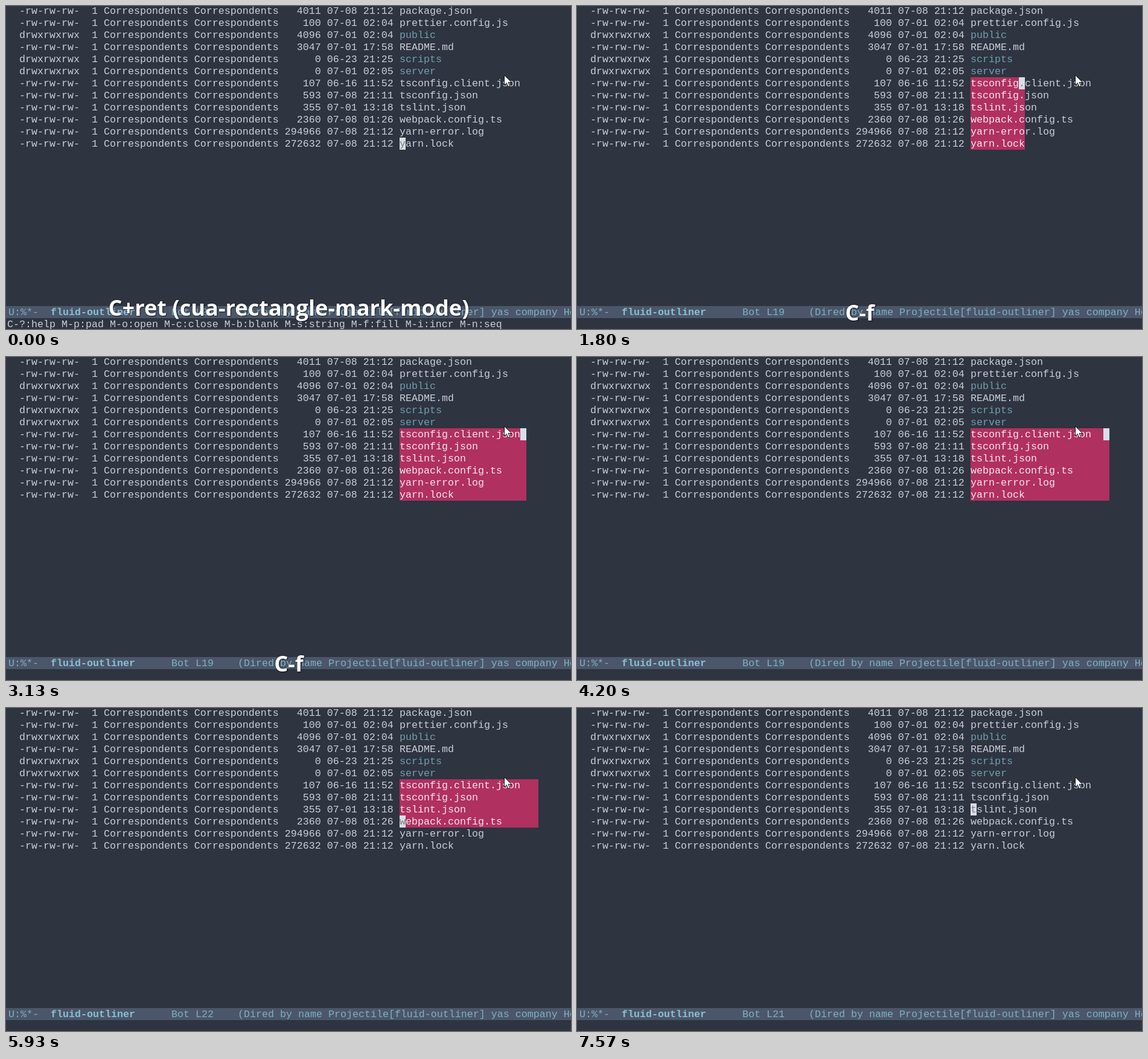
These frames come from a looping animation (936x535 px, 8000 ms). An HTML page:

```html
<!DOCTYPE html>
<html lang="en">
<head>
<meta charset="utf-8">
<title>Rectangle marking</title>
<style>
html, body { margin: 0; width: 100%; height: 100%; overflow: hidden; background: #2e3440; }
svg { display: block; }
text { white-space: pre; }
.mono { font: 16.664px "Liberation Mono", "Courier New", monospace; fill: #c9cfda; }
.mono .dir { fill: #709fad; }
.mono .bar { fill: #7db1c1; }
.mono .bold { fill: #88c0d0; font-weight: bold; }
.mono .hot { fill: #f4e6ec; }
.mono .under { fill: #857c74; }
#caption {
  font: bold 36.2px "Open Sans", "Noto Sans", sans-serif;
  fill: #fff; text-anchor: middle;
  text-shadow: 0 0 2px rgba(0,0,0,.55), 1px 1px 2px rgba(0,0,0,.55);
}
</style>
</head>
<body>
<svg width="936" height="535" viewBox="0 0 936 535">
  <defs><clipPath id="clip"><rect id="clipBox"/></clipPath></defs>
  <rect width="936" height="535" fill="#2e3440"/>
  <rect y="497" width="936" height="20" fill="#4c566a"/>
  <g class="mono">
    <g id="listing"></g>
    <rect id="region" fill="#b03060"/>
    <g id="hotNames" clip-path="url(#clip)"></g>
    <g id="cursor">
      <rect width="10" height="20" fill="#d8dee9"/>
      <text id="cursorChar" class="under" y="15"></text>
    </g>
    <text class="bar" x="4" y="512">U:%*-</text>
    <text class="bar bold" x="74" y="512">fluid-outliner</text>
    <text class="bar" x="274" y="512" id="position"></text>
    <text class="bar" x="384" y="512">(Dired by name Projectile[fluid-outliner] yas company Helm</text>
    <text id="hint" x="2" y="532">C-?:help M-p:pad M-o:open M-c:close M-b:blank M-s:string M-f:fill M-i:incr M-n:seq</text>
  </g>
  <text id="caption" x="468.5"></text>
  <path transform="translate(825.5 114.5)" d="M0 0V16.5L3.8 12.9L6.6 19.2L9.3 18L6.5 11.9H11.8Z"
        fill="#fff" stroke="#111" stroke-width="1"/>
</svg>
<script>
const LOOP = 8000, CELL = 10, LINE = 20, NAME_COL = 65;
const $ = id => document.getElementById(id);
const colX = col => 2 + col * CELL;
const rowY = row => -2 + row * LINE;

const files = [
  ['4011', '07-08 21:12', 'package.json'],
  ['100', '07-01 02:04', 'prettier.config.js'],
  ['4096', '07-01 02:04', 'public', 'dir'],
  ['3047', '07-01 17:58', 'README.md'],
  ['0', '06-23 21:25', 'scripts', 'dir'],
  ['0', '07-01 02:05', 'server', 'dir'],
  ['107', '06-16 11:52', 'tsconfig.client.json'],
  ['593', '07-08 21:11', 'tsconfig.json'],
  ['355', '07-01 13:18', 'tslint.json'],
  ['2360', '07-08 01:26', 'webpack.config.ts'],
  ['294966', '07-08 21:12', 'yarn-error.log'],
  ['272632', '07-08 21:12', 'yarn.lock']
];

function addText(parent, col, row, content, className = '') {
  const node = document.createElementNS('http://www.w3.org/2000/svg', 'text');
  node.setAttribute('x', colX(col));
  node.setAttribute('y', rowY(row) + 15);
  node.setAttribute('class', className);
  node.textContent = content;
  parent.append(node);
}

files.forEach(([size, date, name, kind], row) => {
  const mode = kind ? 'drwxrwxrwx' : '-rw-rw-rw-';
  const owner = 'Correspondents';
  addText($('listing'), 2, row, `${mode}  1 ${owner} ${owner} ${size.padStart(6)} ${date}`);
  addText($('listing'), NAME_COL, row, name, kind);
  addText($('hotNames'), NAME_COL, row, name, 'hot');
});

// Each step changes part of the editor state; mark is the corner opposite the cursor.
const steps = [
  [0, { row: 11, col: 65, mark: [11, 65], on: true, hint: true,
        caption: 'C+ret (cua-rectangle-mark-mode)', base: 513 }],
  [170, { caption: '' }],
  [320, { row: 10, hint: false, caption: 'C-p' }],
  [470, { row: 9 }],
  [640, { row: 8 }],
  [790, { row: 7 }],
  [940, { row: 6 }],
  [1030, { caption: '' }],
  [1110, { col: 66, caption: 'C-f', base: 521 }],
  // held key: about 2.3 columns per screen refresh
  ...Array.from({ length: 7 }, (_, i) =>
    [Math.floor((1650 + i * 460 / 6) / 10) * 10, { col: 66 + Math.round((i + 1) * 16 / 7) }]),
  [2660, { col: 83 }],
  [2890, { col: 84 }],
  [3130, { col: 85 }],
  [3360, { caption: '' }],
  [3590, { col: 86 }],
  [3820, { col: 87 }],
  [4290, { on: false }],
  [4750, { row: 11, col: 65, mark: [6, 87], on: true }],
  [5300, { on: false }],
  [5700, { row: 10, on: true }],
  [5930, { row: 9 }],
  [6080, { row: 8 }],
  [6630, { on: false }],
  [7100, { on: true }],
  [7500, { mark: null }]
];

function setBox(node, x, y, width, height) {
  Object.entries({ x, y, width, height }).forEach(([key, value]) => node.setAttribute(key, value));
}

function render(time) {
  const s = Object.assign({}, ...steps.filter(([at]) => at <= time).map(([, change]) => change));
  const [markRow, markCol] = s.mark || [s.row, s.col];
  const top = Math.min(s.row, markRow), left = Math.min(s.col, markCol);
  const width = s.mark ? (Math.abs(s.col - markCol) + 1) * CELL : 0;
  const height = s.mark ? (Math.abs(s.row - markRow) + 1) * LINE : 0;
  for (const id of ['region', 'clipBox']) setBox($(id), colX(left), rowY(top), width, height);

  $('cursor').setAttribute('transform', `translate(${colX(s.col)} ${rowY(s.row)})`);
  $('cursor').style.display = s.on ? '' : 'none';
  $('cursorChar').textContent = files[s.row][2][s.col - NAME_COL] || '';
  $('position').textContent = `Bot L${s.row + 13}`;
  $('hint').style.display = s.hint ? '' : 'none';
  $('caption').textContent = s.caption;
  $('caption').setAttribute('y', s.base);
}

const start = performance.now();
function tick() {
  render((performance.now() - start) % LOOP);
  requestAnimationFrame(tick);
}
tick();
</script>
</body>
</html>
```
